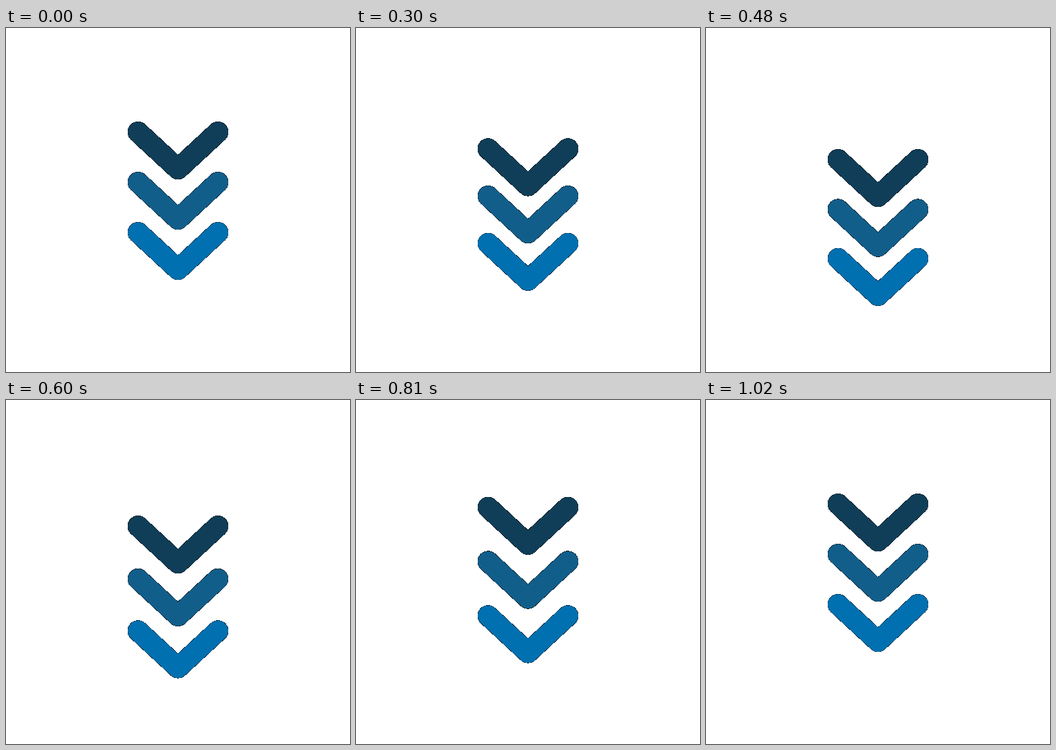
Animation of 500x500 px, one loop 1050 ms. Source, as an HTML page:

```html
<!DOCTYPE html>
<html lang="en">
<head>
<meta charset="utf-8">
<title>Scroll chevrons</title>
<style>
  html, body { margin: 0; height: 100%; overflow: hidden; background: #fff; }
  svg { display: block; width: 100%; height: 100%; }
  use { fill: none; stroke-linecap: round; stroke-linejoin: round; }
  .edge { stroke: #000; stroke-width: 30.8; shape-rendering: crispEdges; }
  .face { stroke-width: 30; }
</style>
</head>
<body>
<svg viewBox="0 0 500 500">
  <defs><path id="chevron" d="M192 151.3L250 204.95L308 151.3"/></defs>
  <g><use href="#chevron" class="edge"/><use href="#chevron" class="face" stroke="#103e58"/></g>
  <g><use href="#chevron" class="edge"/><use href="#chevron" class="face" stroke="#125e8a"/></g>
  <g><use href="#chevron" class="edge"/><use href="#chevron" class="face" stroke="#0070b0"/></g>
</svg>
<script>
  const LOOP = 1050, STEP = 30, SPACING = 73, DROP = 40;
  const chevrons = document.querySelectorAll('g');

  // Eased progress of t from start to end, clamped to 0..1
  const ease = (t, start, end) => {
    const u = Math.min(1, Math.max(0, (t - start) / (end - start)));
    return u * u * (3 - 2 * u);
  };

  function draw(now) {
    const t = Math.floor(now % LOOP / STEP) * STEP;
    chevrons.forEach((chevron, i) => {
      // Each chevron falls a little later than the one above and takes longer to rise
      const down = ease(t, 60 + 30 * i, 480 + 30 * i);
      const up = ease(t, 480 + 30 * i, 900 + 60 * i);
      chevron.setAttribute('transform', `translate(0 ${SPACING * i + DROP * (down - up)})`);
    });
    requestAnimationFrame(draw);
  }
  draw(performance.now());
</script>
</body>
</html>
```
